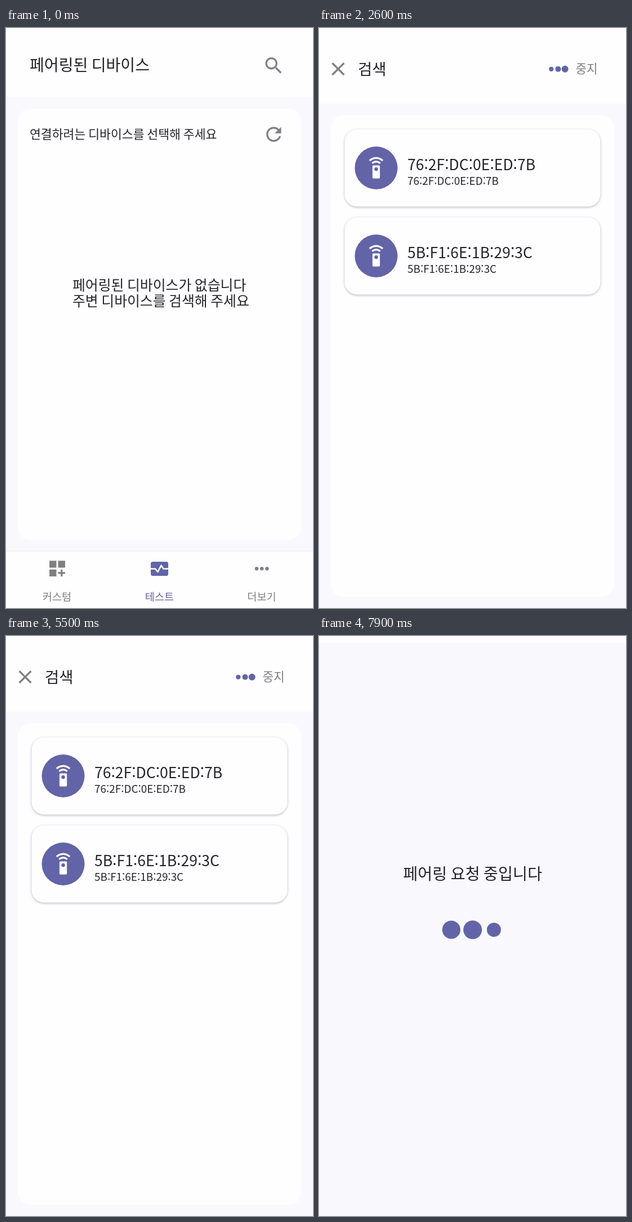
Recreate the animation shown at these times as an HTML page with a canvas. Size 545 by 1028 pixels, loop 8000 ms.

```html
<!DOCTYPE html>
<html lang="ko">
<head>
<meta charset="utf-8">
<style>
html, body { margin: 0; width: 100%; height: 100%; overflow: hidden; background: #f9f8fc; }
canvas { display: block; width: 545px; height: 1028px; }
</style>
</head>
<body>
<canvas id="stage" width="545" height="1028"></canvas>
<script>
const ctx = document.getElementById('stage').getContext('2d');
const W = 545, H = 1028, LOOP = 8000;
const BACK = '#f9f8fc', SURFACE = '#fefdff', ACCENT = '#6264a7', GREY = '#808080', INK = '#242328';
const FONT = '"Noto Sans CJK KR", "Noto Sans KR", "Noto Sans CJK", sans-serif';

const ICONS = {
  search: 'M15.5 14h-.79l-.28-.27C15.41 12.59 16 11.11 16 9.5 16 5.91 13.09 3 9.5 3S3 5.91 3 9.5 5.91 16 9.5 16c1.61 0 3.09-.59 4.23-1.57l.27.28v.79l5 4.99L20.49 19zM9.5 14C7.01 14 5 11.99 5 9.5S7.01 5 9.5 5 14 7.01 14 9.5 11.99 14 9.5 14z',
  refresh: 'M17.65 6.35C16.2 4.9 14.21 4 12 4c-4.42 0-8 3.58-8 8s3.58 8 8 8c3.73 0 6.84-2.55 7.73-6h-2.08c-.82 2.33-3.04 4-5.65 4-3.31 0-6-2.69-6-6s2.69-6 6-6c1.66 0 3.14.69 4.22 1.78L13 11h7V4z',
  close: 'M19 6.41L17.59 5 12 10.59 6.41 5 5 6.41 10.59 12 5 17.59 6.41 19 12 13.41 17.59 19 19 17.59 13.41 12z',
  tiles: 'M3 3h8v8H3zM13 3h8v8h-8zM3 13h8v8H3zM18 13h-2v3h-3v2h3v3h2v-3h3v-2h-3z',
  remote: 'M15 9H9c-.55 0-1 .45-1 1v12c0 .55.45 1 1 1h6c.55 0 1-.45 1-1V10c0-.55-.45-1-1-1zm-3 6c-1.1 0-2-.9-2-2s.9-2 2-2 2 .9 2 2-.9 2-2 2zM7.05 6.05l1.41 1.41C9.37 6.56 10.62 6 12 6s2.63.56 3.54 1.46l1.41-1.41C15.68 4.78 13.93 4 12 4s-3.68.78-4.95 2.05zM12 0C8.96 0 6.21 1.23 4.22 3.22l1.41 1.41C7.26 3.01 9.51 2 12 2s4.74 1.01 6.36 2.64l1.41-1.41C17.79 1.23 15.04 0 12 0z'
};
for (const key in ICONS) ICONS[key] = new Path2D(ICONS[key]);

const DEVICES = [
  { name: '76:2F:DC:0E:ED:7B', address: '76:2F:DC:0E:ED:7B', found: 1600 },
  { name: '5B:F1:6E:1B:29:3C', address: '5B:F1:6E:1B:29:3C', found: 2100 },
  { name: 'fernbasekit', address: 'B8:27:EB:CD:E6:2F', found: 6500 }
];
const SHEET_START = 1080, SHEET_TIME = 300, SHEET_TRAVEL = 1175;
const PAIR_START = 7250, PAIR_FADE = 150;

const clamp = v => Math.min(1, Math.max(0, v));

function rect(x, y, w, h, color) {
  ctx.fillStyle = color;
  ctx.fillRect(x, y, w, h);
}

function panel(x, y, w, h, r, color = SURFACE) {
  ctx.fillStyle = color;
  ctx.beginPath();
  ctx.roundRect(x, y, w, h, r);
  ctx.fill();
}

function circle(x, y, r, color) {
  ctx.fillStyle = color;
  ctx.beginPath();
  ctx.arc(x, y, r, 0, Math.PI * 2);
  ctx.fill();
}

function text(str, x, y, size, weight = 300, color = INK, align = 'left') {
  ctx.font = `${weight} ${size}px ${FONT}`;
  ctx.textAlign = align;
  ctx.fillStyle = color;
  ctx.fillText(str, x, y);
}

function icon(name, x, y, scale = 1.65, color = GREY) {
  ctx.save();
  ctx.translate(x, y);
  ctx.scale(scale, scale);
  ctx.fillStyle = color;
  ctx.fill(ICONS[name], 'evenodd');
  ctx.restore();
}

// Dots swell one after another; each rests at its smallest size until its turn.
function loadingDots(x, y, gap, small, large, elapsed, period, lag) {
  for (let i = 0; i < 3; i++) {
    const cycle = Math.max(0, elapsed / period - i * lag);
    const swell = (1 - Math.cos(cycle * Math.PI * 2)) / 2;
    circle(x + (i - 1) * gap, y, small + (large - small) * swell, ACCENT);
  }
}

function drawTabs() {
  rect(0, 927, W, 101, SURFACE);
  rect(0, 926, W, 2, '#f1f0f4');
  icon('tiles', 72.4, 939.5, 1.55);
  panel(257, 946, 31, 25, 3.5, ACCENT);
  ctx.strokeStyle = SURFACE;
  ctx.lineWidth = 2.6;
  ctx.lineJoin = 'round';
  ctx.stroke(new Path2D('M257 958.5H265L269.5 964 275.5 952.5 279.5 958.5H288'));
  for (const x of [445, 454.2, 463.4]) circle(x, 958.3, 3.2, GREY);
  text('커스텀', 90.5, 1015, 18.6, 300, GREY, 'center');
  text('테스트', 272.5, 1015, 18.6, 300, ACCENT, 'center');
  text('더보기', 454, 1015, 18.6, 300, GREY, 'center');
}

function drawPaired() {
  rect(0, 0, W, H, BACK);
  rect(0, 0, W, 122, SURFACE);
  text('페어링된 디바이스', 42, 76, 28.1, 500);
  icon('search', 455.5, 47);
  panel(21, 143, 503, 764, 22);
  text('연결하려는 디바이스를 선택해 주세요', 42, 196, 21.6);
  icon('refresh', 455.5, 168.7);
  text('페어링된 디바이스가 없습니다', 118, 464.5, 24.85);
  text('주변 디바이스를 검색해 주세요', 118, 492.5, 24.85);
  drawTabs();
}

function drawDevice(device, y) {
  ctx.save();
  ctx.shadowColor = 'rgba(0, 0, 0, 0.28)';
  ctx.shadowBlur = 4;
  ctx.shadowOffsetY = 1.2;
  panel(45.5, y + 0.5, 454, 137, 22);
  ctx.restore();
  circle(101.5, y + 69, 38, ACCENT);
  icon('remote', 81.7, y + 49.7, 1.65, SURFACE);
  text(device.name, 157, y + 73, 26.5, 500);
  text(device.address, 157, y + 99, 18.9);
}

function drawSearch(t) {
  const left = 1 - clamp((t - SHEET_START) / SHEET_TIME);
  ctx.save();
  ctx.translate(0, SHEET_TRAVEL * left * left);
  rect(0, -47, W, 1200, BACK);
  rect(0, -47, W, 181, SURFACE);
  icon('close', 14.2, 52.8);
  text('검색', 69, 82.5, 27.5, 500);
  loadingDots(424.5, 72.8, 12.2, 4.1, 6, t - 1150, 1450, 0.25);
  text('중지', 455.5, 80, 21.3, 300, GREY);
  panel(21, 155, 503, 853, 22);
  DEVICES.forEach((device, i) => {
    if (t >= device.found) drawDevice(device, 179 + i * 156);
  });
  ctx.restore();
}

function drawPairing(t) {
  ctx.save();
  ctx.globalAlpha = clamp((t - PAIR_START) / PAIR_FADE);
  rect(0, 0, W, H, BACK);
  rect(0, 0, W, 12, SURFACE);
  text('페어링 요청 중입니다', 272.7, 431.5, 28.3, 300, INK, 'center');
  loadingDots(272.7, 520.7, 37.8, 12.5, 18.2, t - 7300, 850, 0.39);
  ctx.restore();
}

function draw(now) {
  const t = now % LOOP;
  if (t < SHEET_START + SHEET_TIME) drawPaired();
  if (t >= SHEET_START) drawSearch(t);
  if (t >= PAIR_START) drawPairing(t);
}

const origin = performance.now();
function tick() {
  draw(performance.now() - origin);
  requestAnimationFrame(tick);
}
tick();
</script>
</body>
</html>
```
